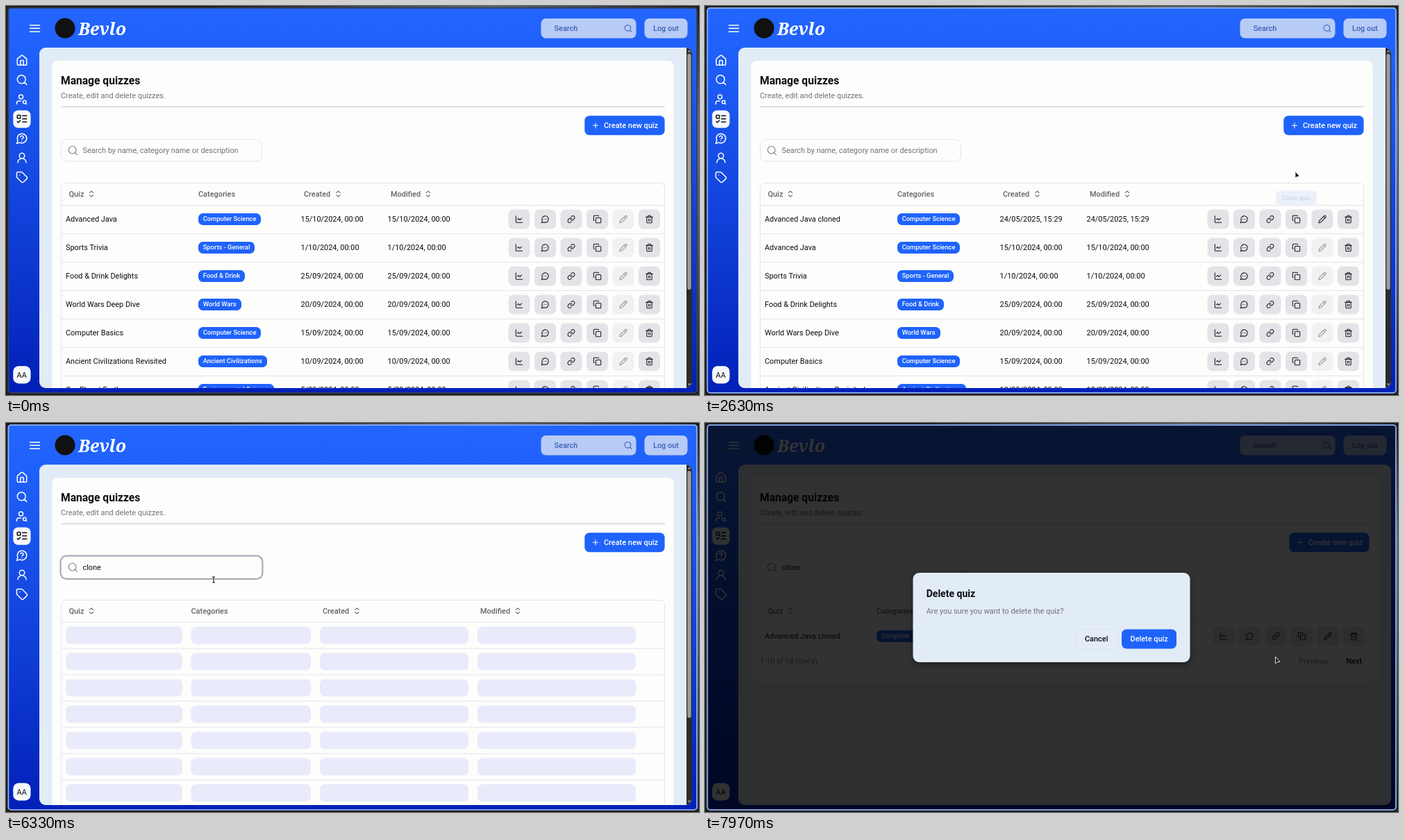
Write an HTML page that moves like this. It is 998 px wide and 561 px high and loops after 8 s.

```html
<!DOCTYPE html>
<html lang="en">
<head>
<meta charset="utf-8">
<title>Manage quizzes</title>
<style>
html, body { margin: 0; width: 100%; height: 100%; overflow: hidden; background: #1d1d1b; }
svg { display: block; width: 998px; height: 561px; }
text { font: 400 10.92px Roboto, sans-serif; fill: #0c0c12; white-space: pre; }
.grey { fill: #71717a; }
.head { fill: #62626b; font-weight: 500; }
.medium { font-weight: 500; }
.white { fill: #fff; font-weight: 500; }
.badge { fill: #fff; font-weight: 500; font-size: 9.36px; }
.soft { fill: #3c61b4; font-weight: 500; }
.tip { fill: #3c61b4; font-weight: 500; font-size: 9.36px; }
.title { font-weight: 600; font-size: 15.6px; }
.dialogTitle { font-weight: 600; font-size: 14.04px; }
.brand { font: italic 800 25px "Noto Serif", serif; fill: #fff; }
</style>
</head>
<body>
<svg id="stage" viewBox="0 0 998 561"></svg>
<script>
const LOOP = 8000, BLUE = '#1f63fb', SOFT = '#b7cbf7', LINE = '#e3e4ee', SKY = '#e2ecf7';

const ring = (x, y, r) => `M${x + r} ${y}a${r} ${r} 0 1 1-${2 * r} 0a${r} ${r} 0 1 1 ${2 * r} 0`;
const bubble = 'M7.9 20A9 9 0 1 0 4 16.1L2 22Z';
const ICONS = {
  menu: 'M3 6h18M3 12h18M3 18h18',
  plus: 'M5 12h14M12 5v14',
  sort: 'M7 15l5 5 5-5M7 9l5-5 5 5',
  home: 'M3 10a2 2 0 0 1 .7-1.5l7-6a2 2 0 0 1 2.6 0l7 6A2 2 0 0 1 21 10v9a2 2 0 0 1-2 2H5a2 2 0 0 1-2-2zM15 21v-8a1 1 0 0 0-1-1h-4a1 1 0 0 0-1 1v8',
  search: ring(11, 11, 8) + 'M21 21l-4.3-4.3',
  userSearch: ring(10, 7, 4) + 'M10 15H6a4 4 0 0 0-4 4v2' + ring(17, 17, 3) + 'M21 21l-1.9-1.9',
  list: 'M4 5h4a1 1 0 0 1 1 1v4a1 1 0 0 1-1 1H4a1 1 0 0 1-1-1V6a1 1 0 0 1 1-1zM3 17l2 2 4-4M13 6h8M13 12h8M13 18h8',
  question: bubble + 'M9.1 9a3 3 0 0 1 5.8 1c0 2-3 3-3 3M12 17h.01',
  user: ring(12, 8, 5) + 'M20 21a8 8 0 0 0-16 0',
  tag: 'M12.6 2.6A2 2 0 0 0 11.2 2H4a2 2 0 0 0-2 2v7.2a2 2 0 0 0 .6 1.4l8.7 8.7a2.4 2.4 0 0 0 3.4 0l6.6-6.6a2.4 2.4 0 0 0 0-3.4zM7.5 7.5h.01',
  chart: 'M3 3v16a2 2 0 0 0 2 2h16M19 9l-5 5-4-4-3 3',
  chat: bubble + 'M8 12h.01M12 12h.01M16 12h.01',
  link: 'M10 13a5 5 0 0 0 7.5.5l3-3a5 5 0 0 0-7-7l-1.8 1.7M14 11a5 5 0 0 0-7.5-.5l-3 3a5 5 0 0 0 7 7l1.7-1.7',
  copy: 'M10 8h10a2 2 0 0 1 2 2v10a2 2 0 0 1-2 2H10a2 2 0 0 1-2-2V10a2 2 0 0 1 2-2zM4 16c-1.1 0-2-.9-2-2V4c0-1.1.9-2 2-2h10c1.1 0 2 .9 2 2',
  pencil: 'M21.2 6.8a1 1 0 0 0-4-4L3.8 16.2a2 2 0 0 0-.5.8L2 21.4a.5.5 0 0 0 .6.6l4.4-1.3a2 2 0 0 0 .8-.5zM15 5l4 4',
  trash: 'M3 6h18M19 6v14a2 2 0 0 1-2 2H7a2 2 0 0 1-2-2V6M8 6V4a2 2 0 0 1 2-2h4a2 2 0 0 1 2 2v2M10 11v6M14 11v6'
};
const ACTIONS = ['chart', 'chat', 'link', 'copy', 'pencil', 'trash'];

// Quiz, category, badge width, date
const QUIZZES = [
  ['Advanced Java', 'Computer Science', 90, '15/10/2024, 00:00'],
  ['Sports Trivia', 'Sports - General', 81, '1/10/2024, 00:00'],
  ['Food & Drink Delights', 'Food & Drink', 67, '25/09/2024, 00:00'],
  ['World Wars Deep Dive', 'World Wars', 62, '20/09/2024, 00:00'],
  ['Computer Basics', 'Computer Science', 90, '15/09/2024, 00:00'],
  ['Ancient Civilizations Revisited', 'Ancient Civilizations', 99, '10/09/2024, 00:00'],
  ['Our Planet Earth', 'Environmental Science', 109, '5/09/2024, 00:00']
];
const CLONED = ['Advanced Java cloned', 'Computer Science', 90, '24/05/2025, 15:29'];

const text = (x, y, str, cls = '') => `<text x="${x}" y="${y}" class="${cls}">${str.replace(/&/g, '&amp;')}</text>`;
const rect = (x, y, w, h, r, fill, extra = '') =>
  `<rect x="${x}" y="${y}" width="${w}" height="${h}" rx="${r}" fill="${fill}" ${extra}/>`;
const rule = (x1, x2, y, color = LINE, w = 1) => rect(x1, y - w / 2, x2 - x1, w, 0, color);
const icon = (name, cx, cy, size, color, weight = 2) =>
  `<path transform="translate(${cx - size / 2} ${cy - size / 2}) scale(${size / 24})" d="${ICONS[name]}" fill="none"
    stroke="${color}" stroke-width="${weight}" stroke-linecap="round" stroke-linejoin="round"/>`;
const group = (id, body, extra = '') => `<g id="${id}" ${extra}>${body}</g>`;

function chrome() {
  const side = ['home', 'search', 'userSearch', 'list', 'question', 'user', 'tag'];
  return rect(3.5, 2.5, 991.5, 555.5, 4, 'url(#blue)')
    + icon('menu', 41.5, 32.3, 18.5, '#fff')
    + '<circle cx="85" cy="32" r="14.5" fill="#111"/>'
    + text(104, 41.5, 'Bevlo', 'brand')
    + rect(770.5, 18, 137, 28.5, 7, SOFT) + text(789.5, 35.5, 'Search', 'soft') + icon('search', 896, 32.3, 13, '#3c61b4')
    + rect(919.5, 18, 62, 28.5, 7, SOFT) + text(932, 35.5, 'Log out', 'soft')
    + rect(10.3, 150.5, 25.2, 25.2, 7, '#f6f8fb')
    + side.map((name, i) => icon(name, 23, 78.5 + 28.1 * i, 18, name === 'list' ? '#111' : '#fff')).join('')
    + rect(10.3, 519.2, 25.2, 25.2, 8, '#f6f8fb') + text(15.6, 535.5, 'AA');
}

function page(right, bottom) {
  return rect(66.5, 79, right + 12.5 - 66.5, bottom - 79, 8, '#fdfdfc')
    + text(79, 113, 'Manage quizzes', 'title')
    + text(79, 133, 'Create, edit and delete quizzes.', 'grey')
    + rule(79, right, 145.3, '#d6d8e4', 1.6)
    + rect(right - 115.7, 158.3, 115.3, 28, 7, BLUE)
    + icon('plus', right - 100, 172.3, 12.5, '#fff')
    + text(right - 88, 176, 'Create new quiz', 'white');
}

function tableHead(right, bottom, [categories, created, modified]) {
  const sortable = (x, label, iconX) => text(x, 274.5, label, 'head') + icon('sort', iconX, 271, 12.5, '#62626b');
  return rect(79.5, 255.5, right - 80, bottom - 255.5, 6, 'none', `stroke="${LINE}"`)
    + sortable(90.5, 'Quiz', 123)
    + text(categories, 274.5, 'Categories', 'head')
    + sortable(created, 'Created', created + 49.5)
    + sortable(modified, 'Modified', modified + 54)
    + rule(79, right, 287.5);
}

function quizRow([name, category, width, date], i, right, [categories, created, modified]) {
  const y = 307.5 + 41 * i;
  const buttons = ACTIONS.map((action, k) => {
    const x = right - 210 + 37.5 * k;
    const off = action === 'pencil' && name !== CLONED[0];
    return `<g opacity="${off ? .45 : 1}">` + rect(x - 15.5, y - 14, 31, 28, 7, '#e3e3e8')
      + icon(action, x, y, 12.5, '#18181b') + '</g>';
  }).join('');
  return text(86, y + 3.5, name)
    + rect(categories, y - 8.4, width, 16.8, 6.5, BLUE) + text(categories + 6.7, y + 2.8, category, 'badge')
    + text(created - 4.4, y + 3.5, date) + text(modified - 4.4, y + 3.5, date)
    + buttons + rule(79, right, y + 21);
}

function quizTable(quizzes, right, bottom, cols) {
  return tableHead(right, bottom, cols) + quizzes.map((q, i) => quizRow(q, i, right, cols)).join('');
}

function skeleton() {
  const bars = [[86, 168], [266.5, 172.5], [452, 214], [679, 228]];
  let out = tableHead(949, 580, [266.5, 456, 683]);
  for (let i = 0; i < 7; i++) {
    const y = 293.7 + 37.9 * i;
    out += bars.map(([x, w]) => rect(x, y, w, 25, 7, '#e9ebfb')).join('') + rule(79, 949, y + 31.5);
  }
  return out;
}

function scrollbar() {
  return rect(980, 60, 8, 491, 0, '#2b2b2b')
    + rect(981.3, 69, 5.4, 340, 2.5, '#9c9c9c', 'id="thumb"')
    + '<path d="M981.5 66.5h5l-2.5-3zM981.5 544.5h5l-2.5 3z" fill="#9c9c9c"/>';
}

function pager() {
  return text(79, 347, '1-10 of 18 row(s)', 'grey')
    + rect(845.5, 332, 62.5, 23.5, 6, '#fdfdfc', 'stroke="#f0f0f3"') + text(855, 347, 'Previous', 'grey')
    + rect(914.5, 332, 42, 23.5, 6, '#fdfdfc', `stroke="${LINE}"`) + text(923.5, 347, 'Next', 'medium');
}

function dialog() {
  return rect(299.5, 216, 399, 129, 9, SKY, 'style="filter:drop-shadow(0 3px 5px #0006)"')
    + text(318.7, 251, 'Delete quiz', 'dialogTitle')
    + text(318.7, 274.5, 'Are you sure you want to delete the quiz?', 'grey')
    + rect(534.5, 297.5, 59, 28, 7, '#e3ecf7', 'stroke="#dae2ef"') + text(547, 315, 'Cancel', 'medium')
    + rect(600, 297.5, 79, 28, 7, BLUE) + text(612.5, 315, 'Delete quiz', 'white');
}

const narrow = [277, 429, 554], wide = [247, 388, 524];
document.getElementById('stage').innerHTML = `
  <defs>
    <linearGradient id="blue" x2="0" y2="1"><stop stop-color="#2366fe"/><stop offset=".12" stop-color="#1f60fa"/><stop offset="1" stop-color="#0220b8"/></linearGradient>
    <linearGradient id="deskSide" x2="0" y2="1"><stop stop-color="#1a1a1a"/><stop offset=".3" stop-color="#6d7078"/><stop offset=".6" stop-color="#55565c"/><stop offset="1" stop-color="#22221e"/></linearGradient>
    <linearGradient id="deskTop"><stop offset=".3" stop-color="#1d1d1b"/><stop offset=".7" stop-color="#59666c"/><stop offset="1" stop-color="#1d1d1b"/></linearGradient>
    <clipPath id="view">${rect(48, 60, 940, 491, 9, '#000')}</clipPath>
  </defs>`
  + rect(0, 0, 998, 3, 0, 'url(#deskTop)')
  + rect(995, 0, 3, 561, 0, 'url(#deskSide)')
  + chrome()
  + group('content',
      rect(48, 60, 940, 491, 0, SKY)
      + group('narrowPage', page(949, 580)) + group('widePage', page(957, 373))
      + rect(79.5, 288, 0, 40, 0, '#f4f4f6', 'id="rowHover"')
      + group('before', quizTable(QUIZZES, 949, 580, narrow))
      + group('after', quizTable([CLONED, ...QUIZZES], 949, 580, narrow))
      + group('loading', skeleton())
      + group('result', quizTable([CLONED], 957, 328.5, wide) + pager())
      + group('cloneHover', rect(836, 293.5, 31, 28, 7, SOFT) + icon('copy', 851.5, 307.5, 12.5, '#1d3f90'))
      + group('trashHover', rect(919, 293.5, 31, 28, 7, SOFT) + icon('trash', 934.5, 307.5, 12.5, '#1d3f90'))
      + group('tooltip', rect(821, 265.7, 61, 21, 6, SOFT) + `<path d="M848.5 286.5h6l-3 3z" fill="${SOFT}"/>`
        + text(829.5, 279.3, 'Clone quiz', 'tip'))
      + rect(79.5, 192.5, 289, 31.5, 8, '#fdfdfc', `id="field" stroke="${LINE}"`)
      + rect(78.5, 191.5, 291, 33.5, 8.5, 'none', 'id="focus" stroke="#a8a8b3" stroke-width="2"')
      + icon('search', 96.3, 208.3, 16, '#7d7d85', 1.7)
      + '<text id="query" x="110.5" y="211.8"></text>'
      + rect(110, 202, 1, 12, 0, '#111', 'id="caret"')
      + group('scroll', scrollbar()),
    'clip-path="url(#view)"')
  + rect(3.5, 2.5, 991.5, 555.5, 4, '#000', 'id="shade"')
  + group('dialog', dialog())
  + rect(3.4, 2.8, 991.6, 555, 4, 'none', 'id="border" stroke-width="1.8"')
  + '<path id="arrow" d="M0 0v9.8l2.4-2.1 3.9-.4z" fill="#050505" stroke="#fff" stroke-width=".9" stroke-linejoin="round"/>'
  + '<path id="beam" d="M-2-4H2M0-4V4M-2 4H2" fill="none" stroke="#111"/>';

const $ = id => document.getElementById(id);
const show = (id, on) => $(id).setAttribute('display', on ? 'inline' : 'none');
const set = (id, attrs) => { for (const k in attrs) $(id).setAttribute(k, attrs[k]); };
const ramp = (t, from, to) => Math.min(1, Math.max(0, (t - from) / (to - from)));
const smooth = p => p * p * (3 - 2 * p);
const zoom = (cx, cy, s) => `translate(${cx} ${cy}) scale(${s}) translate(${-cx} ${-cy})`;

// Pointer stops: time, x, y
const PATH = [[700, 905, 565], [1450, 854, 312.5], [2350, 854, 312.5], [2630, 850, 238.5], [3050, 850, 238.5],
  [3950, 299, 226], [6720, 299, 226], [7450, 939, 307], [7840, 939, 307], [7970, 821.5, 337]];
function pointer(t) {
  const i = PATH.findIndex(stop => stop[0] > t);
  if (i < 0) return PATH[PATH.length - 1].slice(1);
  const [t0, x0, y0] = PATH[Math.max(0, i - 1)], [t1, x1, y1] = PATH[i];
  const p = smooth(ramp(t, t0, t1));
  return [x0 + (x1 - x0) * p, y0 + (y1 - y0) * p];
}

const CLONE_AT = 2100, FOCUS_AT = 4050, LOAD_AT = 5900, RESULT_AT = 6560, BLUR_AT = 7650, DIALOG_AT = 7805;
const KEYS = [4800, 5000, 5180, 5400, 5600];

function draw(t) {
  const [x, y] = pointer(t);
  const done = t >= RESULT_AT, loading = t >= LOAD_AT && !done;
  const right = done ? 957 : 949;
  show('narrowPage', !done);
  show('widePage', done);
  show('scroll', !done);
  show('before', t < CLONE_AT);
  show('after', t >= CLONE_AT && t < LOAD_AT);
  show('loading', loading);
  show('result', done);
  set('thumb', { height: loading ? 356 : 340 });

  const row = Math.floor((y - 287.5) / 41);
  const hovering = t > 700 && t < 7860 && !loading && row >= 0 && (!done || row === 0);
  show('rowHover', hovering);
  set('rowHover', { y: 288 + 41 * row, width: right - 80 });
  const overButton = cx => hovering && row === 0 && Math.abs(x - cx) < 15.5 && Math.abs(y - 307.5) < 14;
  show('cloneHover', !done && overButton(851.5));
  show('trashHover', done && t < DIALOG_AT && overButton(934.5));

  const tip = ramp(t, 1570, 1680) * (1 - ramp(t, 2540, 2660));
  set('tooltip', { opacity: tip, transform: zoom(851.5, 287, .95 + .05 * tip) });

  const typed = 'clone'.slice(0, KEYS.filter(k => t >= k).length);
  const focused = t >= FOCUS_AT && t < BLUR_AT;
  const query = $('query');
  query.textContent = typed || 'Search by name, category name or description';
  query.setAttribute('class', typed ? '' : 'grey');
  set('field', { width: done ? 292.3 : 289 });
  set('focus', {
    width: done ? 294.3 : 291,
    opacity: ramp(t, FOCUS_AT, FOCUS_AT + 120) * (1 - ramp(t, BLUR_AT, BLUR_AT + 120))
  });
  const lastInput = Math.max(FOCUS_AT, ...KEYS.filter(k => k <= t));
  show('caret', focused && (t - lastInput) % 1060 < 540);
  set('caret', { x: typed ? 111 + query.getComputedTextLength() : 110.5 });

  const open = smooth(ramp(t, DIALOG_AT, DIALOG_AT + 155));
  set('shade', { opacity: .8 * open });
  set('dialog', { opacity: open, transform: zoom(499, 280.5, .95 + .05 * open) });
  set('border', { stroke: t < 300 ? '#33415f' : '#8db2f8' });

  const beam = t >= 3930 && t < 6760;
  show('arrow', t >= 700 && !beam);
  show('beam', beam);
  set(beam ? 'beam' : 'arrow', { transform: `translate(${x} ${y})` });
}

function tick() {
  draw(performance.now() % LOOP);
  requestAnimationFrame(tick);
}
tick();
</script>
</body>
</html>
```
